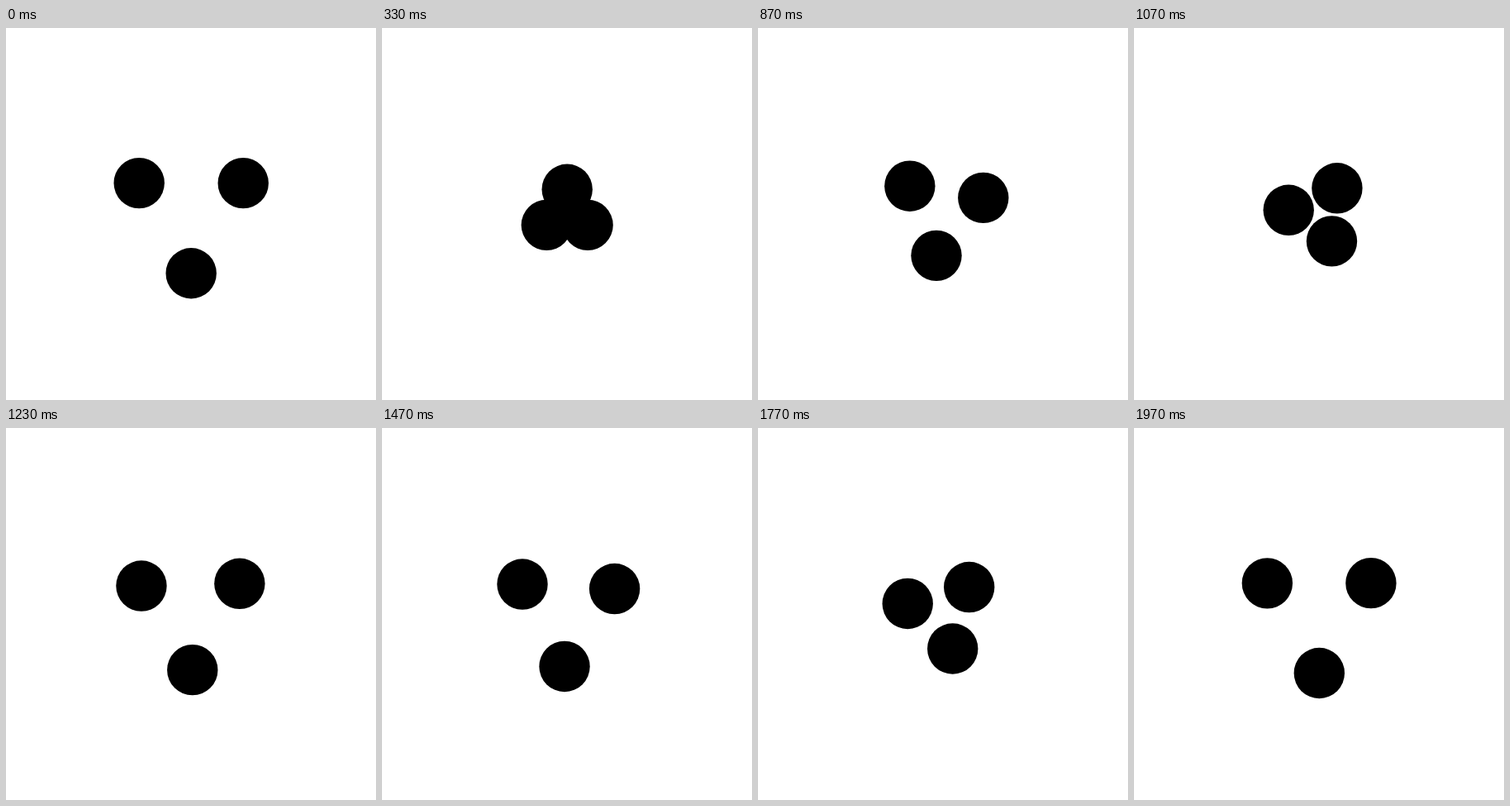
These frames come from a looping animation (448 by 450 pixels, 2.01 s). An HTML page with a canvas:

```html
<!DOCTYPE html>
<html>
<head>
<meta charset="utf-8">
<title>Three orbiting dots</title>
<style>
html, body { margin: 0; width: 100%; height: 100%; overflow: hidden; background: #fff; }
canvas { display: block; }
</style>
</head>
<body>
<canvas id="stage" width="448" height="450"></canvas>
<script>
const ctx = document.getElementById('stage').getContext('2d');
const LOOP = 2010, STEP = 100 / 3, STEPS = 60, SWAP = 20;
const CX = 224.2, CY = 224, RADIUS = 30.7;
const REACH = 36.4, HALF = 63, PINCH = 30.6;

// Symmetric ease-in-out with a power curve
const ease = t => t <= 0.5 ? 0.5 * (2 * t) ** 2.54 : 1 - ease(1 - t);

function draw(time) {
  const step = Math.min(STEPS - 1, Math.floor((time % LOOP + 3.4) / STEP));
  const p = ease(step % SWAP / SWAP), q = 1 - p;

  // Each dot travels to the next corner on a path bent towards the centre
  const out = REACH - PINCH * p * q;
  const along = HALF * (p ** 3 - q ** 3);

  ctx.fillStyle = '#fff';
  ctx.fillRect(0, 0, 448, 450);
  ctx.fillStyle = '#000';
  for (let k = 0; k < 3; k++) {
    const a = (150 + 120 * k) * Math.PI / 180;
    const c = Math.cos(a), s = Math.sin(a);
    ctx.beginPath();
    ctx.arc(CX + out * c - along * s, CY + out * s + along * c, RADIUS, 0, 2 * Math.PI);
    ctx.fill();
  }
}

const start = performance.now();
function tick() {
  draw(performance.now() - start);
  requestAnimationFrame(tick);
}
tick();
</script>
</body>
</html>
```
